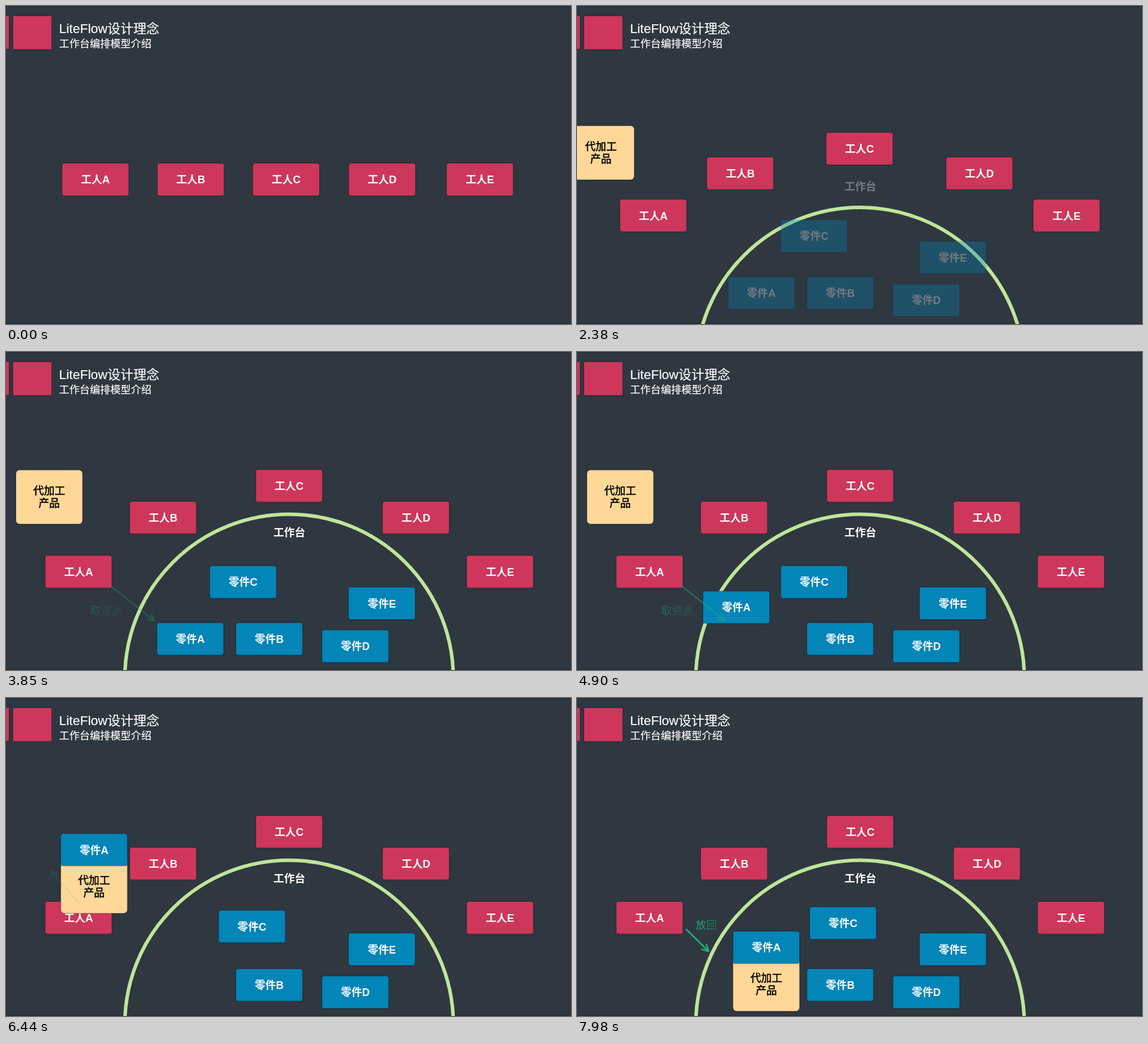
An HTML page that plays this animation: 958x540 px, repeating every 8 s.

```html
<!DOCTYPE html>
<html lang="zh-CN">
<head>
<meta charset="utf-8">
<title>LiteFlow设计理念</title>
<style>
  html, body { margin: 0; width: 100%; height: 100%; overflow: hidden; background: #2f3741; }
  svg { display: block; width: 100vw; height: 100vh; }
  text { font-family: "Liberation Sans", "Noto Sans CJK SC", "Noto Sans CJK", sans-serif; font-size: 18px; fill: #fff; }
  .bold { font-weight: 700; text-anchor: middle; }
  .medium { text-anchor: middle; fill: #000; stroke: #000; stroke-width: .5; }
  .head { stroke: #fff; stroke-width: .2; }
  .card rect, .tab { stroke: #000; stroke-opacity: .14; filter: drop-shadow(.5px .5px 1.2px rgba(0, 0, 0, .3)); }
  .arrow path { fill: none; stroke: #15c880; stroke-width: 2.6; stroke-linecap: round; stroke-linejoin: round; }
  .arrow text { fill: url(#fade); text-anchor: middle; }
</style>
</head>
<body>
<svg id="stage" viewBox="0 0 958 540" xmlns="http://www.w3.org/2000/svg">
  <defs>
    <linearGradient id="fade">
      <stop offset="0" stop-color="#15c880"/>
      <stop offset="1" stop-color="#1b7a5a"/>
    </linearGradient>
  </defs>
  <rect width="958" height="540" fill="#2f3741"/>
  <path d="M0 .5H958M0 539.5H958" stroke="#20252c"/>
  <rect class="tab" x="-20" y="16.5" width="25" height="56.5" fill="#ce375b"/>
  <rect class="tab" x="12" y="17" width="65.3" height="56.5" fill="#ce375b"/>
  <text class="head" x="90" y="46" style="font-size:22px">LiteFlow设计理念</text>
  <text class="head" x="90" y="69.5" style="font-size:17.4px">工作台编排模型介绍</text>
</svg>
<script>
const LOOP = 8000, MOVE = 1150;
const PINK = '#ce375b', BLUE = '#0285b7', SAND = '#ffd898', LIME = '#bfe598';
const stage = document.getElementById('stage');

const clamp = v => Math.min(1, Math.max(0, v));
const mix = (a, b, p) => a + (b - a) * p;
const ramp = (v, from, to) => clamp((v - from) / (to - from));
const easeOut = v => 1 - (1 - v) ** 2;

// cubic-bezier(.25, .1, .25, 1)
function ease(u) {
  const curve = (s, a, b) => 3 * (1 - s) ** 2 * s * a + 3 * (1 - s) * s * s * b + s ** 3;
  let lo = 0, hi = 1;
  for (let i = 0; i < 24; i++) {
    const mid = (lo + hi) / 2;
    if (curve(mid, .25, .25) < u) lo = mid; else hi = mid;
  }
  return curve(lo, .1, 1);
}

function add(parent, tag, attrs, content) {
  const el = document.createElementNS('http://www.w3.org/2000/svg', tag);
  for (const key in attrs) el.setAttribute(key, attrs[key]);
  if (content) el.textContent = content;
  parent.appendChild(el);
  return el;
}

function card(fill, lines, height = 54.6, baseline = 34.2, type = 'bold') {
  const g = add(stage, 'g', { class: 'card' });
  add(g, 'rect', { width: 112.6, height, rx: height > 60 ? 6 : 3.5, fill });
  lines.forEach((line, i) =>
    add(g, 'text', { class: type, x: 56.3, y: baseline + 21 * i }, line));
  return g;
}

function arrow(x1, y1, x2, y2, label, tx, ty) {
  const g = add(stage, 'g', { class: 'arrow' });
  const angle = Math.atan2(y2 - y1, x2 - x1);
  const wing = side => `${x2 - 12 * Math.cos(angle + side)} ${y2 - 12 * Math.sin(angle + side)}`;
  add(g, 'path', { d: `M${x1} ${y1}L${x2} ${y2}M${wing(.5)}L${x2} ${y2}L${wing(-.5)}` });
  add(g, 'text', { x: tx, y: ty }, label);
  return g;
}

const place = (el, from, to, p) =>
  el.setAttribute('transform', `translate(${mix(from[0], to[0], p)} ${mix(from[1], to[1], p)})`);
const show = (el, alpha) => {
  el.setAttribute('opacity', alpha);
  el.setAttribute('visibility', alpha > 0 ? 'visible' : 'hidden');
};

const bench = add(stage, 'circle', { cx: 480, r: 278.5, fill: 'none', stroke: LIME, 'stroke-width': 6 });
const benchLabel = add(stage, 'text', { class: 'bold', x: 480.6, y: 313.3 }, '工作台');

const workers = [
  ['A', [95.3, 267.3], [66.7, 345.8]],
  ['B', [257, 267.3], [210, 254]],
  ['C', [418.7, 267.3], [423.8, 200]],
  ['D', [581.4, 267.3], [638.7, 254]],
  ['E', [747.2, 267.3], [781.3, 345.8]]
].map(([id, from, to]) => ({ el: card(PINK, ['工人' + id]), from, to }));

const product = card(SAND, ['代加工', '产品'], 91.4, 41.6, 'medium');
const parts = {};
for (const id of 'BCDEA') parts[id] = card(BLUE, ['零件' + id]);
place(parts.B, [390, 460], [390, 460], 0);
place(parts.D, [536, 472.3], [536, 472.3], 0);
place(parts.E, [581, 399.5], [581, 399.5], 0);

const fetchArrow = arrow(179, 398.5, 251.5, 456.5, '取资源', 170, 445.5);
const workArrow = arrow(122, 345, 75, 293.5, '加工', 142.5, 325.7);
const returnArrow = arrow(185.5, 393, 223, 430, '放回', 219.3, 391.5);

function draw(t) {
  const u1 = ramp(t, 1832, 1832 + MOVE);
  const u2 = ramp(t, 4733, 4733 + MOVE);
  const u3 = ramp(t, 6205, 6205 + MOVE);
  const [p1, p2, p3] = [u1, u2, u3].map(ease);
  const fadeIn = u => ramp(u, .34, .75);
  const fadeOut = u => 1 - ramp(u, 0, .23);

  for (const w of workers) place(w.el, w.from, w.to, p1);
  bench.setAttribute('cy', mix(855, 554, p1));
  show(benchLabel, fadeIn(u1));
  for (const id in parts) show(parts[id], fadeIn(u1));

  if (u3 > 0) {
    place(product, [17, 200.5], [264.6, 440.3], p3);
    place(parts.A, [17, 157], [264.6, 396.3], p3);
  } else {
    place(product, [-131, 214], [17, 200.5], p1);
    place(parts.A, [256.2, 460], [17, 157], p2);
  }
  place(parts.C, [345.7, 363.3], [394.8, 355], p3);

  show(fetchArrow, easeOut(ramp(t, 3780, 4340)) * fadeOut(u2));
  show(workArrow, fadeIn(u2) * fadeOut(u3));
  show(returnArrow, easeOut(ramp(t, 7940, 8005)));
}

const start = performance.now();
function tick() {
  draw((performance.now() - start) % LOOP);
  requestAnimationFrame(tick);
}
tick();
</script>
</body>
</html>
```
